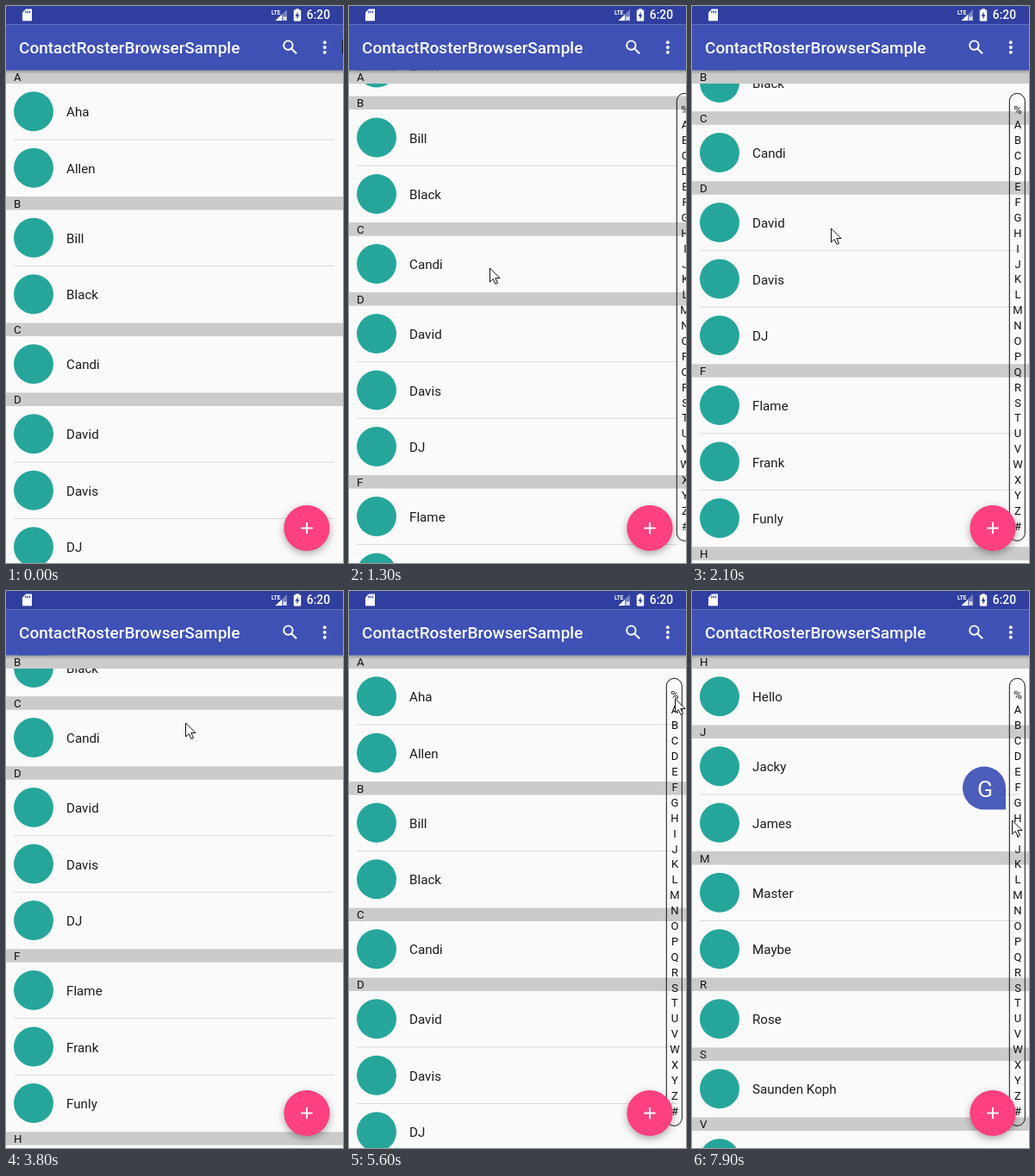
Write an HTML page with a canvas that moves like this. It is 391 px wide and 646 px high and loops after 8000 ms.

```html
<!DOCTYPE html>
<html lang="en">
<head>
<meta charset="utf-8">
<title>Indexed contact list</title>
<style>
  html, body { margin: 0; width: 100%; height: 100%; overflow: hidden; background: #fafafa; }
  canvas { display: block; width: 391px; height: 646px; }
</style>
</head>
<body>
<canvas id="stage" width="391" height="646"></canvas>
<script>
const ctx = document.getElementById('stage').getContext('2d');
const W = 391, H = 646, LOOP = 8000, STEP = 100;
const TOP = 74.5, HEAD = 15.5, ROW = 65.5;
const FONT = 'Roboto, sans-serif';
const LETTERS = '%ABCDEFGHIJKLMNOPQRSTUVWXYZ#';
const FIRST_LETTER = 120, LETTER_GAP = 17.89;
const DRAG_DISTANCE = 245.25, BAR_TRAVEL = 24;
const PRESS_TIME = 5700, TOUCH_LAG = 270;

const groups = [
  'A Aha,Allen', 'B Bill,Black', 'C Candi', 'D David,Davis,DJ', 'F Flame,Frank,Funly',
  'H Hello', 'J Jacky,James', 'M Master,Maybe', 'R Rose', 'S Saunden Koph', 'V Vivian'
].map(entry => ({ letter: entry[0], names: entry.slice(2).split(',') }));

let listHeight = 0;
for (const g of groups) {
  g.top = listHeight;
  listHeight += HEAD + g.names.length * ROW;
}

// Motion
const smooth = u => u * u * (3 - 2 * u);
const glide = u => 1 - (1 - u) ** 1.15;

function progress(t, from, to, ease = smooth) {
  return ease(Math.min(1, Math.max(0, (t - from) / (to - from))));
}

const cursorStart = { x: 390, y: 39 };
const cursorMoves = [
  { from: 0, to: 400, x: 150, y: 495 },
  { from: 700, to: 1300, x: 163, y: 304 },
  { from: 1300, to: 1700, x: 161, y: 258 },
  { from: 2900, to: 3800, x: 208, y: 153 },
  { from: 4050, to: 4800, x: 205, y: 420 },
  { from: 5000, to: 5650, x: 381, y: 120 },
  { from: 6000, to: 7900, x: 371, y: 266, ease: glide }
];

function cursorAt(t) {
  return cursorMoves.reduce((p, m) => {
    const k = progress(t, m.from, m.to, m.ease);
    return { x: p.x + (m.x - p.x) * k, y: p.y + (m.y - p.y) * k };
  }, cursorStart);
}

function dragScroll(t) {
  return DRAG_DISTANCE * (progress(t, 900, 1728) - progress(t, 4150, 4990));
}

function barOffset(t) {
  const shown = progress(t, 1080, 1520) - progress(t, 3300, 3650) + progress(t, 4370, 4754);
  return BAR_TRAVEL * (1 - shown);
}

// Letter under the finger, trailing the pointer slightly.
function touchedIndex(t) {
  const { y } = cursorAt(Math.max(PRESS_TIME, t - TOUCH_LAG));
  return Math.round((y - FIRST_LETTER) / LETTER_GAP);
}

function jumpScroll(index) {
  return groups.find(g => LETTERS.indexOf(g.letter) >= index).top;
}

// Drawing helpers
function rect(x, y, w, h, color) {
  ctx.fillStyle = color;
  ctx.fillRect(x, y, w, h);
}

function roundRect(x, y, w, h, r, color) {
  ctx.fillStyle = color;
  ctx.beginPath();
  ctx.roundRect(x, y, w, h, r);
  ctx.fill();
}

function circle(x, y, r, color) {
  ctx.fillStyle = color;
  ctx.beginPath();
  ctx.arc(x, y, r, 0, Math.PI * 2);
  ctx.fill();
}

function poly(points, color) {
  ctx.beginPath();
  points.forEach(([x, y]) => ctx.lineTo(x, y));
  ctx.closePath();
  ctx.fillStyle = color;
  ctx.fill();
}

function line(x1, y1, x2, y2, width) {
  ctx.strokeStyle = '#fff';
  ctx.lineWidth = width;
  ctx.beginPath();
  ctx.moveTo(x1, y1);
  ctx.lineTo(x2, y2);
  ctx.stroke();
}

function text(str, x, y, size, color, weight = 400, align = 'left') {
  ctx.font = `${weight} ${size}px ${FONT}`;
  ctx.textAlign = align;
  ctx.fillStyle = color;
  ctx.fillText(str, x, y);
}

// Screen parts
function drawHeader(letter, y) {
  rect(0, y, W, HEAD, '#cbcbcb');
  text(letter, 9, y + 12.5, 13.3, '#111');
}

function drawRow(name, y, divided) {
  const mid = y + ROW / 2;
  circle(32, mid - 0.4, 23, '#26a69a');
  text(name, 70, mid + 5.7, 15.2, '#1c1c1c');
  if (divided) rect(9, y + ROW - 1, 372, 1, '#d9d9d9');
}

function drawList(scroll) {
  ctx.save();
  ctx.beginPath();
  ctx.rect(0, 74, W, H - 74);
  ctx.clip();
  for (const g of groups) {
    const y = TOP + g.top - scroll;
    drawHeader(g.letter, y);
    g.names.forEach((name, i) =>
      drawRow(name, y + HEAD + i * ROW, i < g.names.length - 1));
  }
  const stuck = groups.findLastIndex(g => g.top <= scroll);
  const push = Math.min(0, groups[stuck + 1].top - scroll - HEAD);
  drawHeader(groups[stuck].letter, TOP + push);
  ctx.restore();
}

function drawIndex(offset) {
  if (offset >= BAR_TRAVEL) return;
  ctx.strokeStyle = '#111';
  ctx.lineWidth = 1;
  ctx.beginPath();
  ctx.roundRect(368.3 + offset, 101.3, 18, 519, 9);
  ctx.stroke();
  [...LETTERS].forEach((c, i) =>
    text(c, 378 + offset, FIRST_LETTER + i * LETTER_GAP + 4.6, 13, '#111', 400, 'center'));
}

function drawBubble(index) {
  const bottom = FIRST_LETTER + index * LETTER_GAP + 8.3;
  roundRect(314, bottom - 50, 50, 50, [25, 25, 0, 25], 'rgba(63, 81, 181, .93)');
  text(LETTERS[index], 340, bottom - 15, 26.6, '#fff', 400, 'center');
}

function drawFab() {
  ctx.save();
  ctx.shadowColor = 'rgba(0, 0, 0, .33)';
  ctx.shadowBlur = 8;
  ctx.shadowOffsetY = 3;
  circle(349, 605.5, 26.6, '#ff4081');
  ctx.restore();
  rect(342.3, 604.6, 13.4, 1.9, '#fff');
  rect(348.1, 598.8, 1.9, 13.4, '#fff');
}

function drawStatusBar() {
  const blue = '#303f9f';
  rect(0, 0, W, 21.5, blue);
  poly([[23, 3.5], [30, 3.5], [30, 17.3], [19, 17.3], [19, 7.5]], '#fff');
  for (let i = 0; i < 3; i++) rect(22.3 + i * 2.3, 5.5, 1.2, 2.8, blue);

  text('LTE', 308, 9.8, 6.4, '#fff', 700);
  poly([[326, 4], [326, 17], [312.5, 17]], 'rgba(255, 255, 255, .35)');
  poly([[320, 10], [320, 17], [312.5, 17]], '#fff');
  line(321.5, 12.5, 325.5, 16.5, 1.2);
  line(325.5, 12.5, 321.5, 16.5, 1.2);

  rect(336, 3.3, 4, 2, '#fff');
  roundRect(333.8, 4.5, 8.4, 13, 1, '#fff');
  poly([[338.6, 6.5], [335.6, 11.8], [337.5, 11.8], [337.5, 15.5], [340.5, 10.2], [338.6, 10.2]], blue);
  text('6:20', 376, 15, 13.8, '#fff', 500, 'right');
}

function drawToolbar() {
  const shade = ctx.createLinearGradient(0, 74, 0, 79);
  shade.addColorStop(0, 'rgba(0, 0, 0, .28)');
  shade.addColorStop(1, 'rgba(0, 0, 0, 0)');
  rect(0, 74, W, 5, shade);
  rect(0, 21.5, W, 53, '#3f51b5');
  text('ContactRosterBrowserSample', 15, 55.2, 19, '#fff', 500);

  ctx.strokeStyle = '#fff';
  ctx.lineWidth = 1.9;
  ctx.beginPath();
  ctx.arc(327.4, 45.6, 5.2, 0, Math.PI * 2);
  ctx.stroke();
  line(331, 49.2, 337.1, 55.3, 2.1);
  for (let i = -1; i <= 1; i++) circle(369.8, 48 + i * 5.7, 1.95, '#fff');
}

function drawCursor({ x, y }) {
  ctx.save();
  ctx.translate(x + 0.5, y);
  poly([[0, 0], [0, 16], [3.7, 12.6], [6.5, 18.5], [9, 17.3], [6.3, 11.6], [11.5, 11.5]], '#fff');
  ctx.strokeStyle = '#111';
  ctx.lineWidth = 1;
  ctx.stroke();
  ctx.restore();
}

function render(t) {
  const touching = t >= PRESS_TIME;
  const index = touchedIndex(t);
  rect(0, 0, W, H, '#fafafa');
  drawList(touching ? jumpScroll(index) : dragScroll(t));
  drawIndex(barOffset(t));
  if (touching) drawBubble(index);
  drawFab();
  drawToolbar();
  drawStatusBar();
  drawCursor(cursorAt(t));
}

const start = performance.now();
function tick() {
  const t = (performance.now() - start) % LOOP;
  render(Math.floor(t / STEP) * STEP);
  requestAnimationFrame(tick);
}
tick();
</script>
</body>
</html>
```
